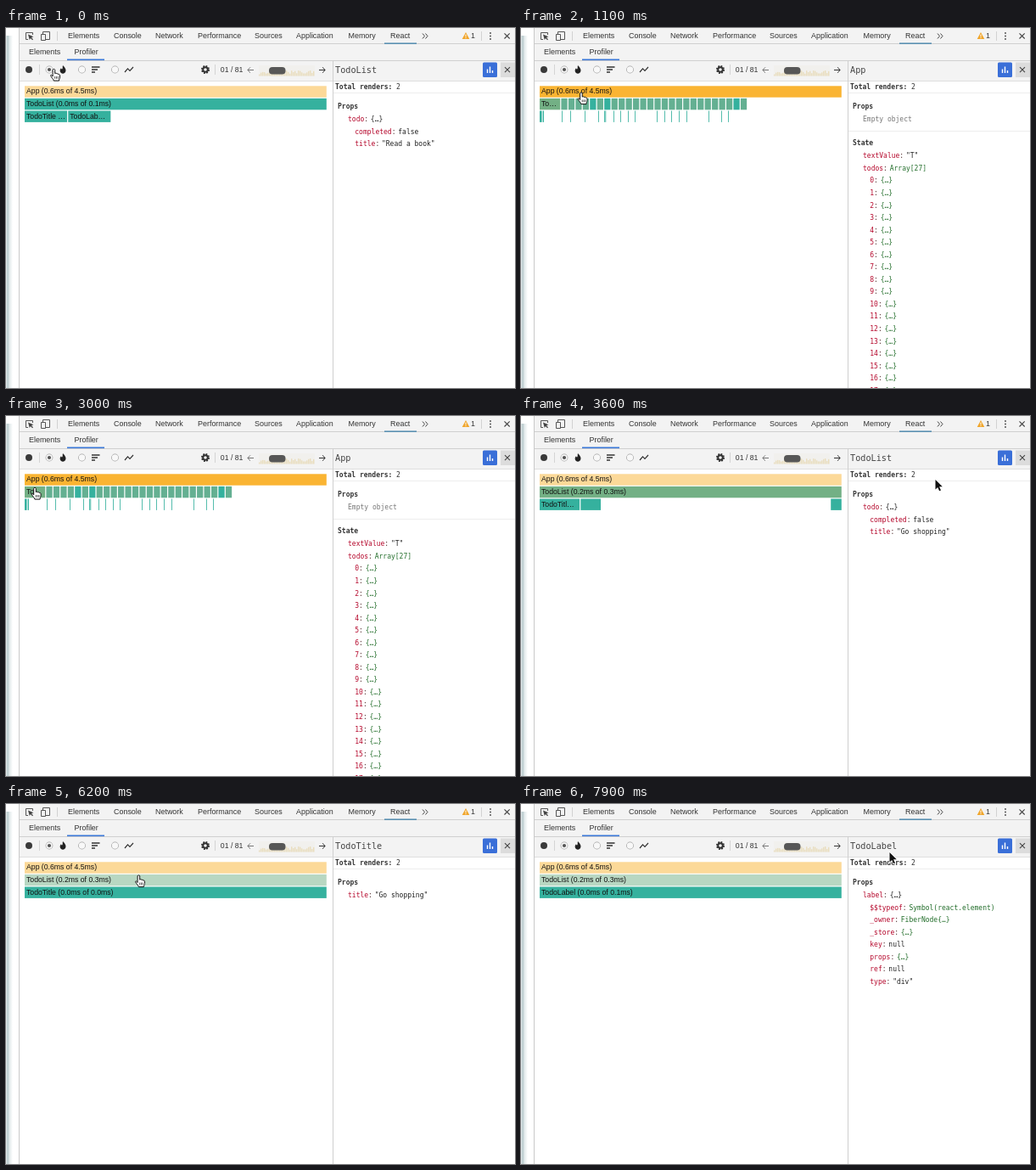
Write an HTML page with a canvas that moves like this. It is 600 px wide and 424 px high and loops after 8 s.

```html
<!DOCTYPE html>
<html lang="en">
<head>
<meta charset="utf-8">
<title>Profiler</title>
<style>
html, body { margin: 0; width: 600px; height: 424px; overflow: hidden; background: #fff; }
canvas { display: block; }
</style>
</head>
<body>
<canvas id="stage" width="600" height="424"></canvas>
<script>
const c = document.getElementById('stage').getContext('2d');
const LOOP = 8000;
const SANS = '"Liberation Sans", Arial, sans-serif';
const MONO = '"DejaVu Sans Mono", monospace';
const INK = '#333', RED = '#b5082c', GREEN = '#236e2b', TEAL = '#35b19e';

// ---------- drawing helpers ----------
const lerp = (a, b, p) => a + (b - a) * p;
const ease = p => { p = Math.min(1, Math.max(0, p)); return p * p * (3 - 2 * p); };

function rect(x, y, w, h, color) {
  c.fillStyle = color;
  c.fillRect(x, y, w, h);
}
function text(s, x, y, font, color = INK) {
  c.font = font;
  c.fillStyle = color;
  c.fillText(s, x, y);
}
function stroke(d, color = '#444', width = 1) {
  c.strokeStyle = color;
  c.lineWidth = width;
  c.stroke(new Path2D(d));
}
function fill(d, color) {
  c.fillStyle = color;
  c.fill(new Path2D(d));
}
function disc(x, y, r, color) {
  c.fillStyle = color;
  c.beginPath();
  c.arc(x, y, r, 0, 7);
  c.fill();
}
function radio(x, on) {
  disc(x, 49, 4.4, '#a2a2a2');
  disc(x, 49, 3.7, '#f8f8f8');
  if (on) disc(x, 49, 2.1, '#555');
}

// ---------- flame graph ----------
const LEFT = 22, WIDTH = 357, GAP = 1.2;
const node = (depth, x, w, color, label = '') => ({ depth, x, w, color, label });

const app = node(0, 0, WIDTH, '#fab432', 'App (0.6ms of 4.5ms)');
const shop = node(1, 0, 25.4, '#73b085', 'TodoList (0.2ms of 0.3ms)');
const shopTitle = node(2, 0, 3.66, TEAL, 'TodoTitle (0.0ms of 0.0ms)');
const shopLabel = node(2, 3.66, 1.885, TEAL, 'TodoLabel (0.0ms of 0.1ms)');
const items = Array.from({ length: 26 }, (_, i) =>
  node(1, 25.4 + i * 8.46, 8.46, [4, 6, 24].includes(i) ? TEAL : '#64b092', 'TodoList (0.0ms of 0.1ms)'));
const book = items[6];
const marks = [48, 58, 75, 91, 109, 117, 126, 134, 160, 169, 177, 186, 195, 221, 236, 244]
  .map(x => node(2, x - LEFT, 1.2, TEAL));
const nodes = [
  app, shop, ...items, shopTitle, shopLabel, ...marks,
  node(2, book.x, 1.215, TEAL, 'TodoTitle (0.0ms of 0.0ms)'),
  node(2, book.x + 1.215, 1.215, TEAL, 'TodoLabel (0.0ms of 0.1ms)')
];

function fit(s, room) {
  if (c.measureText(s).width <= room) return s;
  while (s && c.measureText(s + '…').width > room) s = s.slice(0, -1);
  return s && s + '…';
}

function drawFlame(from, to, elapsed) {
  c.save();
  c.beginPath();
  c.rect(LEFT - 1, 64, WIDTH + 1, 60);
  c.clip();
  const font = '8.7px ' + SANS;
  for (const n of nodes) {
    const p = ease((elapsed - (n.depth === 2 ? 90 : 0)) / 250);
    const s0 = WIDTH / from.w, s1 = WIDTH / to.w;
    const x = lerp((n.x - from.x) * s0, (n.x - to.x) * s1, p);
    const w = n.w * lerp(s0, s1, p);
    const left = Math.max(0, x), right = Math.min(WIDTH, x + w);
    if (right - left < 0.3) continue;
    const box = right - left - Math.min(GAP, w * 0.3);
    const y = 68.3 + n.depth * 14.6;
    c.globalAlpha = 1 - lerp(n.depth < from.depth, n.depth < to.depth, p) / 2;
    rect(LEFT + left, y, box, 13.4, n.color);
    c.globalAlpha = 1;
    if (!n.label || box < 24) continue;
    c.font = font;
    // a sibling pushed aside takes its wider label at once
    const pushed = n.depth === to.depth && n.x > to.x;
    text(fit(n.label, (pushed ? Math.max(box, n.w * s1) : box) - 4), LEFT + left + 2, y + 9.1, font, '#111');
  }
  c.restore();
}

// ---------- side panel ----------
const todo = title => [
  [0, 'todo', '{…}'], [1, 'completed', 'false'], [1, 'title', `"${title}"`]
];
const views = {
  book: { name: 'TodoList', focus: book, rows: todo('Read a book') },
  app: {
    name: 'App', focus: app,
    state: [
      [0, 'textValue', '"T"'], [0, 'todos', 'Array[27]', GREEN],
      ...Array.from({ length: 18 }, (_, i) => [1, String(i), '{…}', GREEN])
    ]
  },
  shop: { name: 'TodoList', focus: shop, rows: todo('Go shopping') },
  title: { name: 'TodoTitle', focus: shopTitle, rows: [[0, 'title', '"Go shopping"']] },
  label: {
    name: 'TodoLabel', focus: shopLabel,
    rows: [
      [0, 'label', '{…}'], [1, '$$typeof', 'Symbol(react.element)', GREEN],
      [1, '_owner', 'FiberNode{…}', GREEN], [1, '_store', '{…}', GREEN],
      [1, 'key', 'null'], [1, 'props', '{…}', GREEN], [1, 'ref', 'null'], [1, 'type', '"div"']
    ]
  }
};

function drawRows(rows, y) {
  const font = '8px ' + MONO;
  rows.forEach(([level, key, value, color = '#222'], i) => {
    const x = 403 + level * 8.3, base = y + i * 14.55;
    text(key, x, base, font, RED);
    const end = x + c.measureText(key).width;
    text(':', end, base, font, '#533');
    text(value, end + 7.6, base, font, color);
  });
}

function drawPanel({ name, rows, state }) {
  const bold = 'bold 8px ' + MONO, plain = '8px ' + MONO;
  text(name, 388, 52.7, '10.2px ' + MONO, '#444');
  text('Total renders:', 388, 72, bold);
  text('2', 460, 72, plain);
  rect(386, 76, 214, 1, '#eee');
  text('Props', 391, 94.5, bold);
  if (rows) drawRows(rows, 110);
  if (state) {
    text('Empty object', 403, 110, plain, '#777');
    rect(386, 121, 214, 1, '#eee');
    text('State', 391, 138, bold);
    drawRows(state, 153.3);
  }
}

// ---------- window frame ----------
const tabs = [['Elements', 73], ['Console', 127], ['Network', 176], ['Performance', 226],
  ['Sources', 293], ['Application', 342], ['Memory', 403.5], ['React', 453]];

function drawFrame() {
  rect(0, 0, 600, 424, '#fff');
  const shade = c.createLinearGradient(0, 0, 8, 0);
  shade.addColorStop(0, '#eef3f4');
  shade.addColorStop(0.25, '#b4c6c9');
  shade.addColorStop(0.5, '#e2eaeb');
  shade.addColorStop(1, '#fff');
  rect(0, 9, 8, 415, shade);
  rect(15, 0, 1, 424, '#c9c9c9');
  rect(16, 0, 584, 62, '#f3f3f3');
  for (const y of [18, 38, 62]) rect(16, y, 584, 1, y === 62 ? '#dedede' : '#d0d0d0');
  rect(385, 38, 1, 386, '#cfcfcf');

  // top tabs
  const font = '8.95px ' + SANS;
  stroke('M26 13.5H23.5V5.5H31.5V8', '#555');
  fill('M26 7.5L32.5 10.2 30 11 32 13.4 31 14.3 29 12 27.8 14Z', '#444');
  stroke('M43.5 7V4.5H51.5V13.5H47', '#555');
  stroke('M41.5 7.5H46.5V14.5H41.5Z', '#555');
  rect(60, 4, 1, 11, '#d2d2d2');
  for (const [s, x] of tabs) text(s, x, 12.4, font);
  rect(446, 17.5, 38, 1.3, '#3d7fa8');
  stroke('M491 6.5L493.5 9.5 491 12.5M494.5 6.5L497 9.5 494.5 12.5', '#444');
  fill('M542 5L546.3 13H537.7Z', '#f0a52a');
  rect(541.5, 7.5, 1, 3, '#fff');
  rect(541.5, 11.2, 1, 1, '#fff');
  text('1', 548, 12.4, font);
  rect(560, 4, 1, 11, '#d2d2d2');
  for (const y of [6, 9.5, 13]) disc(571, y, 0.9, '#444');
  stroke('M587.5 6.3L593.7 12.5M593.7 6.3L587.5 12.5', '#444', 1.1);

  // second row
  text('Elements', 27, 31, font);
  text('Profiler', 80.5, 31, font);
  rect(72, 36.5, 44, 1.6, '#3b78d8');

  // toolbar
  disc(27, 49, 4, '#3a3a3a');
  rect(39, 43, 1, 12, '#d4d4d4');
  radio(51, true);
  fill('M67 44C70 47 71 49 70.3 51.3 69.3 54.4 64.7 54.4 63.8 51.3 63.3 49.3 64.2 48 65 47.2 65.2 48.3 66 48.6 66.3 48.3 67.2 47.3 66.4 45.5 67 44Z', '#222');
  radio(89.5);
  stroke('M101 46H110.5M101 49H108M101 52H105', '#333', 1.3);
  radio(128.5);
  stroke('M140 52L143.5 47.8 146 50.4 150 46', '#333', 1.2);
  c.setLineDash([1.8, 1.34]);
  stroke('M239 49A4 4 0 1 1 231 49 4 4 0 1 1 239 49', '#333', 2);
  c.setLineDash([]);
  stroke('M237.8 49A2.8 2.8 0 1 1 232.2 49 2.8 2.8 0 1 1 237.8 49', '#333', 2);
  rect(246, 43, 1, 12, '#d4d4d4');
  text('01 / 81', 252.8, 52.3, '8.7px ' + SANS);
  stroke('M292 49.5H285M288 46.3L284.8 49.5 288 52.7', '#777', 1);
  stroke('M369 49.5H376M373 46.3L376.3 49.5 373 52.7', '#333', 1);
  rect(298, 44, 66, 12.5, '#f1f0ed');
  for (let i = 0; i < 33; i++) {
    const h = 2 + 4.5 * Math.abs(Math.sin(i * i * 1.7 + i));
    rect(298 + i * 2, 56.5 - h, 1.4, h, '#e9ddbd');
  }
  c.fillStyle = '#575757';
  c.beginPath();
  c.roundRect(310, 46, 19.5, 8.5, 4);
  c.fill();
  c.fillStyle = '#3a6fd8';
  c.beginPath();
  c.roundRect(562, 40.5, 17, 17.5, 1.5);
  c.fill();
  stroke('M567.5 53V48.5M570.5 53V45.5M573.5 53V50', '#fff', 1.4);
  rect(583, 40.5, 17, 17.5, '#dcdcdc');
  stroke('M588 46.2L594 52.2M594 46.2L588 52.2', '#444', 1.1);
}

// ---------- pointer ----------
const path = [
  [0, 56.5, 48.5], [500, 71, 76], [1150, 71, 76], [1600, 430, 110], [1850, 405, 95],
  [2200, 66, 68.5], [2600, 66, 68.5], [3050, 33, 85], [3320, 33, 85], [3600, 488.5, 75],
  [3900, 470, 127], [4200, 470, 127], [4600, 52, 104], [5000, 52, 104], [5450, 410, 50],
  [5700, 410, 50], [6150, 156.5, 84], [6550, 156.5, 84], [7000, 84, 104], [7420, 84, 104],
  [7700, 434.5, 57], [8000, 434.5, 57]
];
const HAND = 'M-1.4 8.5V.9C-1.4 -.5 1.2 -.5 1.2 .9V5.2C1.6 4.4 3.4 4.5 3.5 5.6 4 5 5.3 5.2 5.4 6.2 6.2 5.8 7 6.3 7 7.3V9.5C7 11 6 11.5 6 13.6H-.2C-.3 11.8 -3 10 -3.8 7.8 -4.2 6.6 -2.8 6.2 -1.4 8.5Z';
const ARROW = 'M0 0V11.5L2.7 9 4.6 13.3 6.5 12.4 4.6 8.3H8.3Z';

function drawPointer(t) {
  const i = path.findIndex(k => k[0] > t);
  const [t0, x0, y0] = path[i - 1], [t1, x1, y1] = path[i];
  const p = ease((t - t0) / (t1 - t0));
  const x = lerp(x0, x1, p), y = lerp(y0, y1, p);
  c.save();
  c.translate(x, y);
  if (x < 380 && y < 112) {
    fill(HAND, '#fff');
    stroke(HAND, '#111', 1);
    stroke('M1.2 8.5V11.3M3 8.5V11.3M4.8 8.5V11.3', '#111', 0.7);
  } else {
    stroke(ARROW, '#fff', 1.6);
    fill(ARROW, '#111');
  }
  c.restore();
}

// ---------- timeline ----------
const clicks = [[-1000, 'book'], [600, 'app'], [3300, 'shop'], [4880, 'title'], [6500, 'shop'], [7400, 'label']];
const start = performance.now();

function draw() {
  const t = Math.max(0, performance.now() - start) % LOOP;
  const i = clicks.filter(k => k[0] <= t).length - 1;
  const [at, name] = clicks[i];
  const before = clicks[Math.max(0, i - 1)][1];
  drawFrame();
  drawFlame(views[before].focus, views[name].focus, t - at);
  drawPanel(views[name]);
  drawPointer(t);
  requestAnimationFrame(draw);
}
draw();
</script>
</body>
</html>
```
